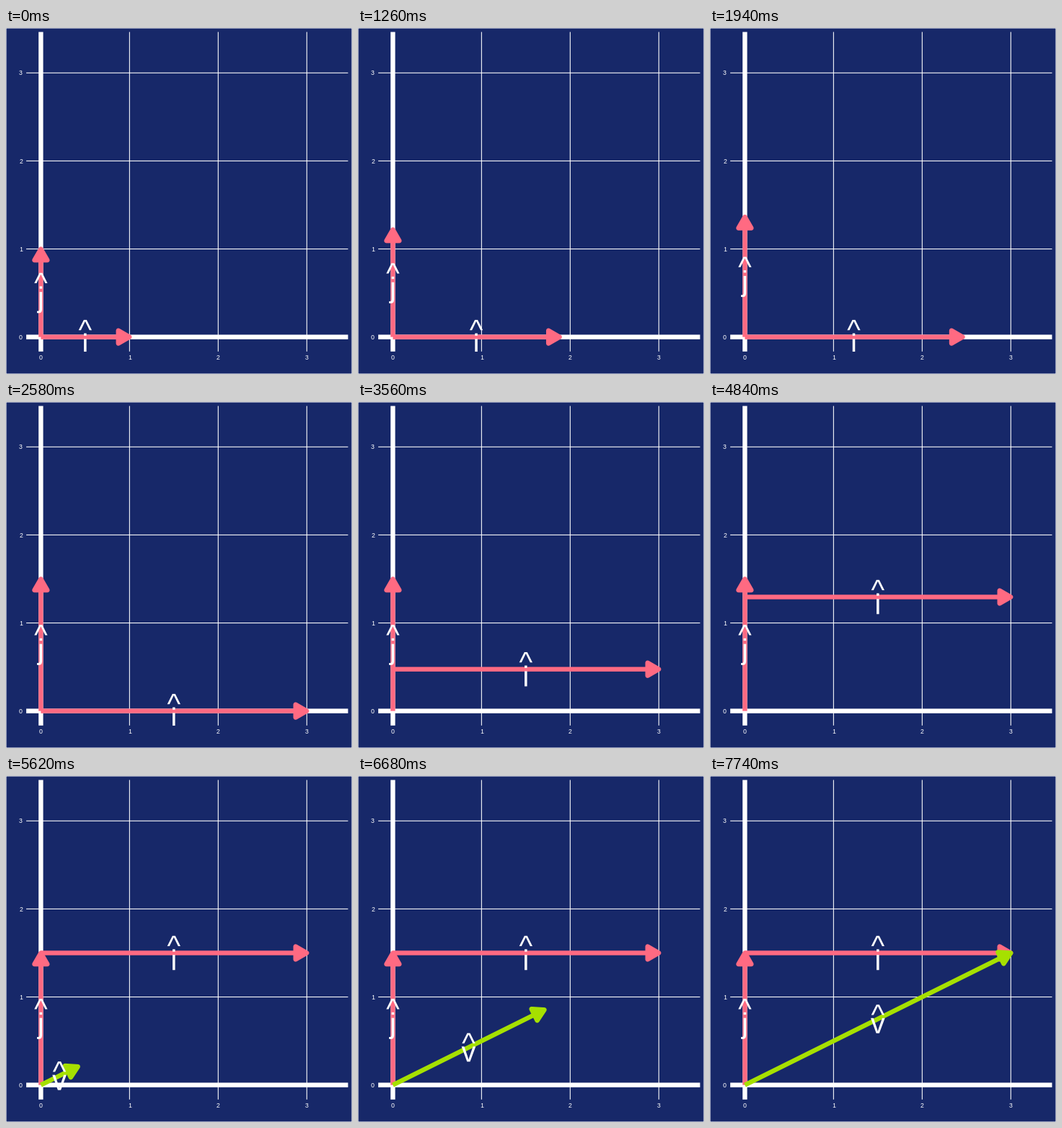
A matplotlib script that plays this animation: 480x480 px, repeating every 8 s.

```python
import numpy as np
import matplotlib.pyplot as plt
from matplotlib.animation import FuncAnimation
from matplotlib.patches import PathPatch, Polygon, Rectangle
from matplotlib.textpath import TextPath
from matplotlib.transforms import Affine2D

SIZE, DPI = 480, 72          # at 72 dpi one point is one pixel
FRAMES, INTERVAL = 400, 20

NAVY, PINK, GREEN, WHITE = "#172869", "#FF6A82", "#A6E000", "#FFFFFF"
FONT = "Liberation Sans"
THICK, THIN = 6.4, 1.07
LEFT, RIGHT, BOTTOM, TOP = 28.1, 474.5, 31.2, 474.5
SPAN, PAD = 3.63, 0.165
EM = 39.83
ADVANCE = {"i": 0.222, "j": 0.222, "v": 0.5, "^": 0.469}

plt.rcParams["path.snap"] = False
fig = plt.figure(figsize=(SIZE / DPI, SIZE / DPI), dpi=DPI, facecolor=NAVY)
ax = fig.add_axes([0, 0, 1, 1])
ax.set(xlim=(0, SIZE), ylim=(0, SIZE))
ax.axis("off")


def to_px(x, y):
    """Grid units to stage pixels, y pointing up."""
    return np.array([LEFT + (x + PAD) * (RIGHT - LEFT) / SPAN,
                     BOTTOM + (y + PAD) * (TOP - BOTTOM) / SPAN])


def line(xs, ys, width):
    ax.plot(xs, ys, color=WHITE, lw=width, solid_capstyle="butt", zorder=1)


def glyph(char):
    path = TextPath((0, 0), char, size=EM, prop={"family": FONT})
    return path.transformed(Affine2D().translate(-ADVANCE[char] * EM / 2, 0))


class Vector:
    """Arrow with a hatted letter at its middle."""
    HEAD, HALF = 18 * np.cos(np.pi / 6), 9

    def __init__(self, letter, color, zorder):
        self.shaft, = ax.plot([], [], color=color, lw=THICK,
                              solid_capstyle="butt", zorder=zorder)
        self.head = Polygon(np.zeros((3, 2)), closed=True, fc=color, ec=color,
                            lw=THICK, joinstyle="round", zorder=zorder)
        ax.add_patch(self.head)

        body, hat = glyph(letter), glyph("^")
        low, high = body.get_extents().y0, body.get_extents().y1 + 18.6
        raised = hat.transformed(
            Affine2D().translate(0, high - hat.get_extents().y1))
        shift = Affine2D().translate(0, -(low + high) / 2)
        self.shapes = [p.transformed(shift) for p in (body, raised)]
        self.marks = []
        for shape in self.shapes:
            mark = PathPatch(shape, fc=WHITE, lw=0, zorder=10)
            ax.add_patch(mark)
            mark.set_clip_path(panel)
            self.marks.append(mark)

    def place(self, start, end):
        a, b = to_px(*start), to_px(*end)
        d = (b - a) / np.hypot(*(b - a))
        side = np.array([-d[1], d[0]]) * self.HALF
        base = b - d * self.HEAD
        self.shaft.set_data(*zip(a, b))
        self.head.set_xy([base + side, b, base - side])
        move = Affine2D().translate(*(a + b) / 2)
        for mark, shape in zip(self.marks, self.shapes):
            mark.set_path(shape.transformed(move))

    def show(self, on):
        for artist in (self.shaft, self.head, *self.marks):
            artist.set_visible(on)


ax.add_patch(Rectangle((0, 0), SIZE, SIZE, fc=NAVY, ec=WHITE, lw=THIN, zorder=0))
panel = Rectangle((LEFT, BOTTOM), RIGHT - LEFT, TOP - BOTTOM, fc="none", ec="none")
ax.add_patch(panel)

for k in range(4):
    x, y = to_px(k, k)
    width = THIN if k else THICK
    line([x, x], [BOTTOM, TOP], width)
    line([LEFT, RIGHT], [y, y], width)
    style = dict(color=WHITE, size=8.8, family=FONT, va="baseline")
    ax.text(x, 20, str(k), ha="center", **style)
    ax.text(23, y - 3.15, str(k), ha="right", **style)

i_vec = Vector("i", PINK, 3)
j_vec = Vector("j", PINK, 2)
v_vec = Vector("v", GREEN, 4)


def progress(n, first, last):
    return min(max((n - first) / (last - first), 0), 1)


def update(n):
    stretch = progress(n, 11, 129)
    lift = 1.5 * progress(n, 141, 258)
    grow = 0.15 + 2.85 * progress(n, 270, 387)
    i_vec.place((0, lift), (1 + 2 * stretch, lift))
    j_vec.place((0, 0), (0, 1 + 0.5 * stretch))
    v_vec.place((0, 0), (grow, grow / 2))
    v_vec.show(n >= 258)
    return []


anim = FuncAnimation(fig, update, frames=FRAMES, interval=INTERVAL,
                     repeat=True, repeat_delay=0, blit=False)
plt.show()
```
